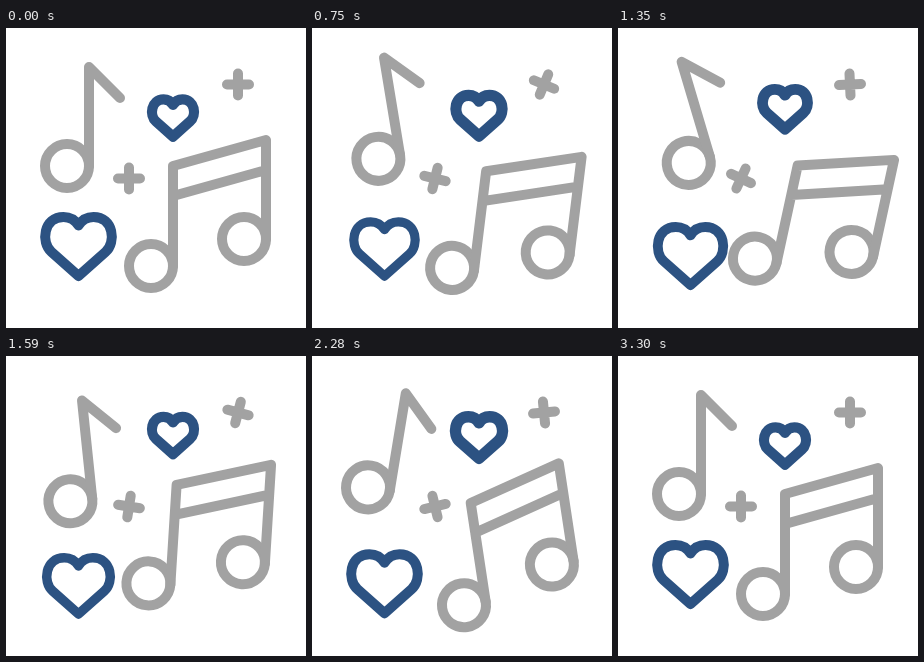
Write an HTML page that moves like this. It is 300 px wide and 300 px high and loops after 3.6 s.

```html
<!DOCTYPE html>
<html lang="en">
<head>
<meta charset="utf-8">
<title>Music notes and hearts</title>
<style>
  html, body { margin: 0; width: 100%; height: 100%; overflow: hidden; background: #fff; }
  svg { display: block; width: 100vw; height: 100vh; }
  g { fill: none; stroke-width: 10; stroke-linecap: round; stroke-linejoin: round; }
  .notes { stroke: #a2a2a2; }
  .hearts { stroke: #2c5282; }
  #smallHeart { stroke-width: 16.2; }
</style>
</head>
<body>
<svg viewBox="0 0 300 300">
  <defs>
    <path id="heart" d="M0 29.5L-27 5.5C-38 -4 -35 -29.5 -15 -29.5C-8 -29.5 -3 -26 0 -21C3 -26 8 -29.5 15 -29.5C35 -29.5 38 -4 27 5.5Z"/>
    <path id="plus" d="M-11 0H11M0 -11V11"/>
  </defs>
  <g class="notes">
    <g id="single">
      <circle cx="61" cy="138" r="22"/>
      <path d="M83 138V39L114 70"/>
    </g>
    <g id="double">
      <circle cx="145" cy="238" r="22"/>
      <circle cx="238" cy="211" r="22"/>
      <path d="M167 238V138L260 112V211M167 168L260 142"/>
    </g>
    <use id="plusTop" href="#plus"/>
    <use id="plusLeft" href="#plus"/>
  </g>
  <g class="hearts">
    <use id="smallHeart" href="#heart"/>
    <use id="bigHeart" href="#heart"/>
  </g>
</svg>
<script>
const LOOP = 3600, START = 300, DURATION = 3000, STEP = 30;
const el = id => document.getElementById(id);
const smooth = k => (1 - Math.cos(Math.PI * k)) / 2;

// Eased interpolation through the given times and values.
function track(times, values) {
  return u => {
    let i = 1;
    while (i < times.length - 1 && u > times[i]) i++;
    const k = (u - times[i - 1]) / (times[i] - times[i - 1]);
    return values[i - 1] + (values[i] - values[i - 1]) * smooth(k);
  };
}

const swing = (a, b, c) => track([0, .3, .6, .81, 1], [0, a, b, c, 0]);
const hump = height => u => height * smooth(2 * u);

const notes = [
  { id: 'single', x: 76, y: 106, angle: swing(-18.7, 13.5, -8.5),
    lift: track([0, .25, .52, .76, 1], [0, -14, 12.5, -13.3, 0]) },
  { id: 'double', x: 191.5, y: 195, angle: swing(14, -12.3, 7.2),
    lift: track([0, .25, .49, .76, 1], [0, 12, -11, 11.5, 0]) }
];
const pluses = [
  { id: 'plusTop', x: 232, y: 56.5, angle: hump(110) },
  { id: 'plusLeft', x: 123, y: 150.5, angle: swing(28, -20, 14) }
];
const hearts = [
  { id: 'smallHeart', x: 167, y: 90, size: .63, rise: hump(-11),
    pulse: track([0, .25, .44, .65, .86, 1], [1, 1.15, 1, 1.12, 1, 1]) },
  { id: 'bigHeart', x: 72.5, y: 218.5, size: 1, rise: hump(12),
    pulse: track([0, .14, .28, .46, .66, .84, 1], [1, .92, 1, .95, 1, .965, 1]) }
];

function draw(u) {
  const place = (id, value) => el(id).setAttribute('transform', value);
  for (const n of notes)
    place(n.id, `translate(0 ${n.lift(u)}) rotate(${n.angle(u)} ${n.x} ${n.y})`);
  for (const p of pluses)
    place(p.id, `translate(${p.x} ${p.y}) rotate(${p.angle(u)})`);
  for (const h of hearts)
    place(h.id, `translate(${h.x} ${h.y + h.rise(u)}) scale(${h.size * h.pulse(u)})`);
}

const origin = performance.now();
function tick() {
  const t = Math.max(0, performance.now() - origin) % LOOP;
  const stepped = Math.floor(t / STEP) * STEP;
  draw(Math.min(1, Math.max(0, (stepped - START) / DURATION)));
  requestAnimationFrame(tick);
}
tick();
</script>
</body>
</html>
```
